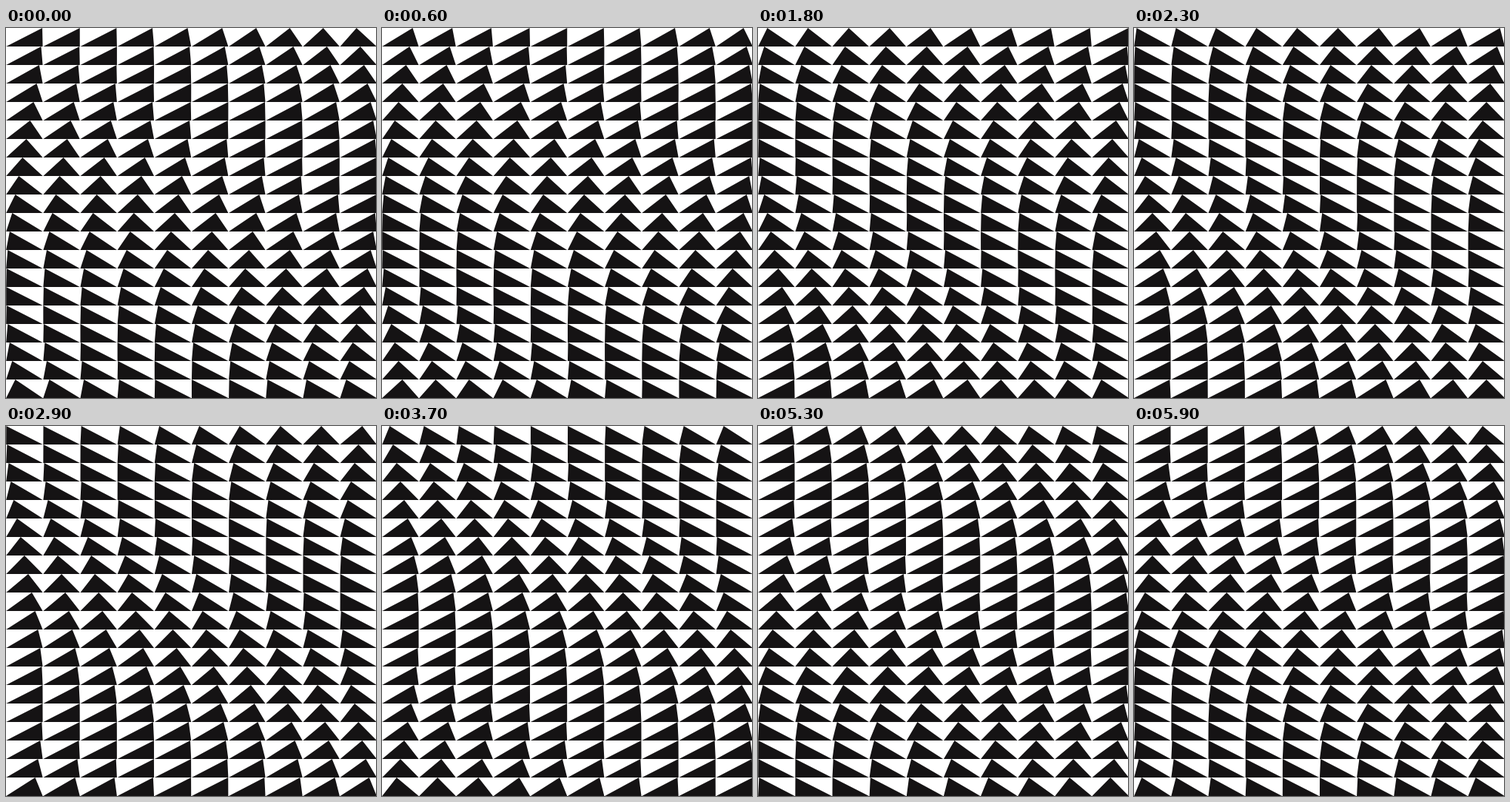
An HTML page with a canvas for the animation above (6 s loop, 500x500 px).

```html
<!DOCTYPE html>
<html lang="en">
<head>
<meta charset="utf-8">
<title>Triangle wave</title>
<style>
html, body { margin: 0; width: 100%; height: 100%; overflow: hidden; background: #fff; }
canvas { display: block; }
</style>
</head>
<body>
<canvas id="stage" width="500" height="500"></canvas>
<script>
const ctx = document.getElementById('stage').getContext('2d');
const COLS = 10, ROWS = 20;
const PITCH = 50.15, WIDTH = 49.4, HEIGHT = 25;
const STEP_MS = 100, STEPS = 60;
const CELL_PHASE = Math.PI / 15;

function triangle(left, top, phase) {
  const apex = left + WIDTH / 2 * (1 + Math.cos(phase));
  ctx.moveTo(left, top + HEIGHT);
  ctx.lineTo(apex, top);
  ctx.lineTo(left + WIDTH, top + HEIGHT);
  ctx.closePath();
}

function draw(step) {
  ctx.fillStyle = '#fff';
  ctx.fillRect(0, 0, 500, 500);
  ctx.fillStyle = '#151314';
  ctx.beginPath();
  for (let row = 0; row < ROWS; row++) {
    for (let col = 0; col < COLS; col++) {
      const phase = CELL_PHASE * (row - col + 1 + step / 2);
      triangle(0.2 + col * PITCH, row * HEIGHT, phase);
    }
  }
  ctx.fill();
}

const start = performance.now();
function tick() {
  const elapsed = performance.now() - start;
  draw(Math.floor(elapsed / STEP_MS) % STEPS);
  requestAnimationFrame(tick);
}
tick();
</script>
</body>
</html>
```
